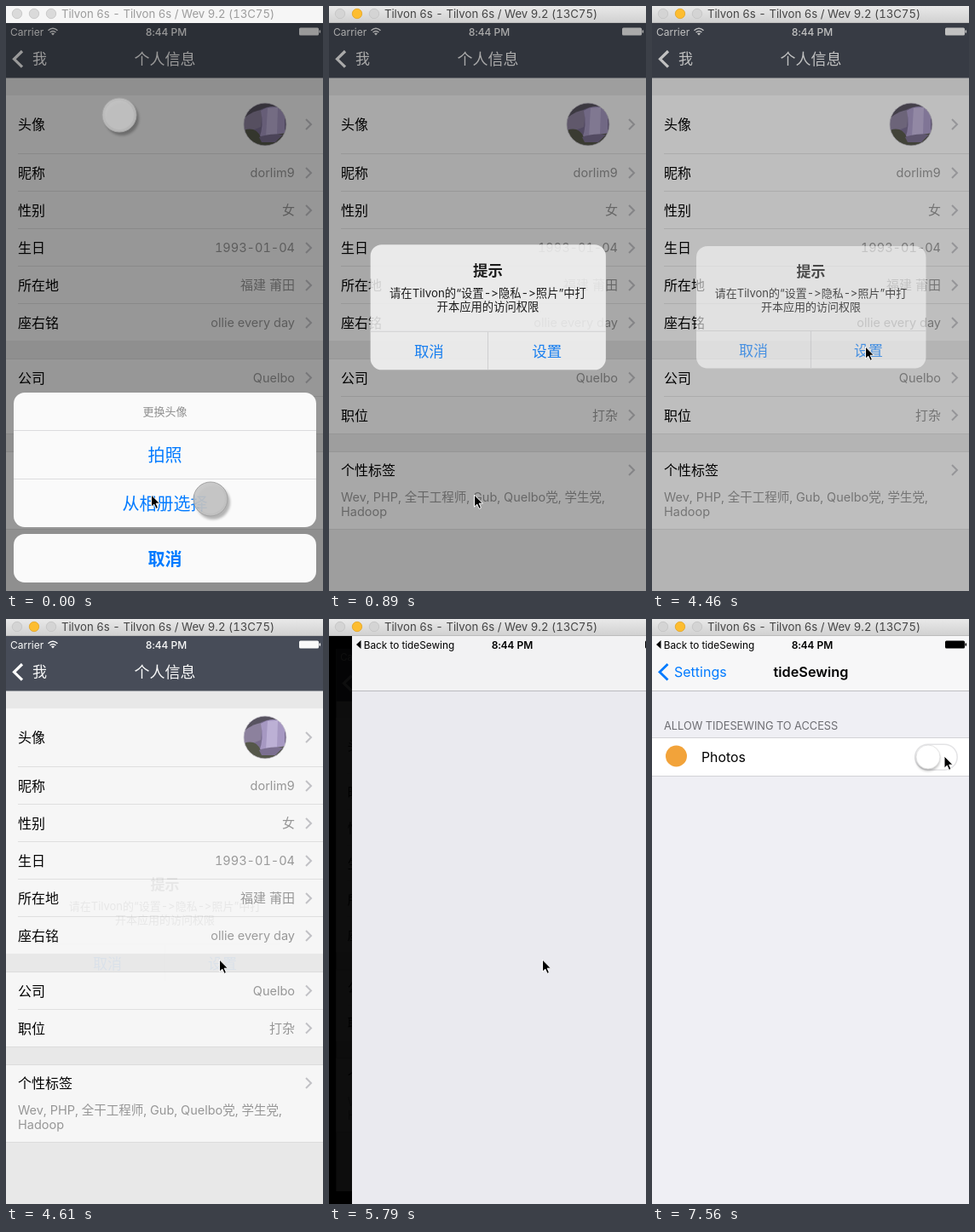
An HTML page for the animation above (8 s loop, 372 by 687 pixels).

```html
<!DOCTYPE html>
<html lang="zh-CN">
<head>
<meta charset="utf-8">
<title>个人信息</title>
<style>
html, body { margin: 0; width: 100%; height: 100%; overflow: hidden; background: #000; }
svg { display: block; width: 372px; height: 687px; }
text {
  font-family: Inter, "Noto Sans CJK SC", "Noto Sans CJK", sans-serif; white-space: pre;
  font-variant-ligatures: none; font-feature-settings: "calt" 0, "tnum" 1;
}
</style>
</head>
<body>
<svg id="stage" viewBox="0 0 372 687" xmlns="http://www.w3.org/2000/svg"></svg>
<script>
const LOOP = 8000, TICK = 148.2, W = 372, H = 687;
const BLUE = '#007aff';

const rect = (x, y, w, h, fill, more = '') =>
  `<rect x="${x}" y="${y}" width="${w}" height="${h}" fill="${fill}" ${more}/>`;
const circle = (x, y, r, fill, more = '') =>
  `<circle cx="${x}" cy="${y}" r="${r}" fill="${fill}" ${more}/>`;
const text = (x, y, size, fill, str, anchor = 'start', weight = 400) =>
  `<text x="${x}" y="${y}" font-size="${size}" fill="${fill}" text-anchor="${anchor}" font-weight="${weight}">${str}</text>`;
const mid = (x, y, size, fill, str, weight) => text(x, y, size, fill, str, 'middle', weight);
const path = (d, stroke, width, more = '') =>
  `<path d="${d}" fill="none" stroke="${stroke}" stroke-width="${width}" ${more}/>`;
const group = (id, body, more = '') => `<g id="${id}" ${more}>${body}</g>`;
const hline = (x, y, x2, color) => path(`M${x} ${y}H${x2}`, color, 1);

function battery(color) {
  return rect(344, 25.5, 23, 9, color, 'rx="1.5"') + rect(367.5, 28.2, 1.6, 3.6, color, 'rx=".8"');
}

function chevron(y) {
  return path(`M352 ${y - 6}l6 6l-6 6`, '#c5c5c9', 2);
}

function row(y, label, value, size = 14.5) {
  return text(14, y + 6, 16, '#000', label) + text(339, y + 5.3, size, '#999', value, 'end') + chevron(y);
}

function titleBar() {
  const lights = colors => colors.map((c, i) =>
    circle(13 + 20 * i, 9, 5.7, c, `stroke="${i === 1 && c[1] === 'f' ? '#e3a422' : '#c3c3c3'}" stroke-width=".8"`)).join('');
  const name = 'Tilvon 6s - Tilvon 6s / Wev 9.2 (13C75)';
  return group('idle', rect(0, 0, W, 20, '#f6f6f6') + lights(['#dadada', '#dadada', '#dadada']) +
      mid(190, 14, 13.2, '#9c9c9c', name)) +
    group('active', rect(0, 0, W, 20, 'url(#bar)') + hline(0, 19.5, W, '#bdbdbd') +
      lights(['#d4d4d4', '#fdbd30', '#d4d4d4']) + mid(190, 14, 13.2, '#444', name));
}

function avatar() {
  return `<g clip-path="url(#face)">` + rect(279, 114, 50, 50, '#7b6f92') +
    `<path d="M279 114H329V121Q312 115 300 121L279 134Z" fill="#5a5562"/>
     <path d="M279 132Q291 122 301 122L299 142L279 150Z" fill="#8f84a0"/>
     <path d="M299 123Q312 114 327 122V150L297 156Q303 140 299 123Z" fill="#a99bc6"/>
     <path d="M307 120L319 119L318 150L305 153Z" fill="#c0b4d9"/>
     <path d="M279 146Q293 141 299 154L329 149V164H279Z" fill="#57594b"/>
     <path d="M297 154Q309 149 325 151L316 160H300Z" fill="#7d7193"/></g>` +
    circle(304, 139, 25, 'none', 'stroke="#d5d2da" stroke-width=".8"');
}

function profile() {
  const white = rect(0, 105, W, 288, '#fbfbfb') + rect(0, 415, W, 87, '#fbfbfb') + rect(0, 524, W, 90, '#fbfbfb');
  const lines = [173.5, 217.5, 261.5, 305.5, 349.5, 458.5].map(y => hline(14, y, W, '#e3e3e3')).join('') +
    [414.5, 502.5, 523.5, 614.5].map(y => hline(0, y, W, '#e0e0e0')).join('');
  const wifi = path('M49.5 28.8Q55 23.8 60.5 28.8M51.6 31Q55 28 58.4 31', '#fff', 1.5) +
    '<path d="M53 32.2Q55 30.6 57 32.2L55 34.4Z" fill="#fff"/>';
  return rect(0, 20, W, 667, '#ededed') + rect(0, 20, W, 64.5, '#484e5a') +
    text(5, 34.5, 12, '#fff', 'Carrier') + wifi + mid(188, 34.5, 12, '#fff', '8:44 PM', 500) + battery('#fff') +
    path('M19 53L9.5 62.3L19 71.6', '#fff', 3.2) + text(31, 68, 17, '#fff', '我') +
    mid(186.5, 68.5, 18, '#fff', '个人信息', 500) + white + lines +
    row(139, '头像', '') + avatar() + row(196, '昵称', 'dorlim9') + row(240, '性别', '女', 15) +
    row(284, '生日', '1993-01-04') + row(328, '所在地', '福建 莆田', 15) + row(372, '座右铭', 'ollie every day') +
    row(436.5, '公司', 'Quelbo') + row(480.5, '职位', '打杂', 15) + row(545, '个性标签', '') +
    text(14, 582, 14.5, '#999', 'Wev, PHP, 全干工程师, Gub, Quelbo党, 学生党,') +
    text(14, 599, 14.5, '#999', 'Hadoop');
}

function sheet() {
  return rect(9, 454, 355, 158, '#fafafa', 'rx="13"') + rect(9, 620, 355, 57, '#fafafa', 'rx="13"') +
    mid(186.5, 481, 13, '#8f8f8f', '更换头像') + hline(9, 498.5, 364, '#dcdcde') + mid(186.5, 534.5, 20, BLUE, '拍照') +
    hline(9, 555.5, 364, '#dcdcde') + mid(186.5, 591.5, 20, BLUE, '从相册选择') + mid(186.5, 656.5, 20, BLUE, '取消', 600);
}

function alertBox() {
  return rect(52, 282, 269.5, 143.5, '#f8f8f8', 'rx="13"') + mid(186.5, 318, 17, '#000', '提示', 600) +
    mid(186.5, 342, 13, '#000', '请在Tilvon的“设置-&gt;隐私-&gt;照片”中打') + mid(186.5, 358, 13, '#000', '开本应用的访问权限') +
    hline(52, 381.5, 321.5, '#d8d8da') + path('M186.5 382V425', '#d8d8da', 1) +
    mid(119, 410.5, 17, BLUE, '取消') + mid(254, 410.5, 17, BLUE, '设置');
}

function touch(x, y) {
  return circle(x + 3, y + 4, 20, '#000', 'opacity=".28" filter="url(#soft)"') +
    circle(x, y, 20, '#c3c3c3', 'fill-opacity=".86" stroke="#a4a4a4" stroke-width="1"') +
    circle(x, y, 17, '#cbcbcb', 'fill-opacity=".4"');
}

function settings() {
  const page = path('M18.5 53L9 62.3L18.5 71.6', BLUE, 2.8) + text(26, 68, 16, BLUE, 'Settings') +
    mid(186.5, 68, 16.3, '#000', 'tideSewing', 600) + text(14, 129.5, 12.8, '#6d6d72', 'ALLOW TIDESEWING TO ACCESS') +
    rect(0, 139, W, 46, '#fff') + hline(0, 139.5, W, '#d2d2d6') + hline(0, 184.5, W, '#d2d2d6') +
    circle(28.5, 161, 12.5, '#f2a33a') + text(58, 168, 15.8, '#000', 'Photos') +
    rect(308.7, 147.2, 49.5, 30, '#fff', 'rx="15" stroke="#e3e3e5" stroke-width="1.5"') +
    circle(324, 164.5, 14, '#000', 'opacity=".25" filter="url(#soft)"') +
    circle(324, 162, 14, '#fff', 'stroke="#d9d9d9" stroke-width=".7"');
  return rect(0, 20, W, 667, '#efeff4') + rect(0, 20, W, 64, '#f7f7f8') + hline(0, 84.5, W, '#bfbfc3') +
    '<path d="M5 30L10.5 25V35Z"/>' + text(13.7, 34.5, 11.8, '#000', 'Back to tideSewing') +
    mid(188, 34.5, 12, '#000', '8:44 PM', 600) + battery('#000') + group('page', page) +
    rect(0, 20, W, 667, '#000', 'id="shade"');
}

document.getElementById('stage').innerHTML = `<defs>
  <linearGradient id="bar" x2="0" y2="1"><stop stop-color="#e9e9e9"/><stop offset="1" stop-color="#d0d0d0"/></linearGradient>
  <filter id="soft" x="-30%" y="-30%" width="160%" height="160%"><feGaussianBlur stdDeviation="1.8"/></filter>
  <clipPath id="face"><circle cx="304" cy="139" r="25"/></clipPath></defs>` +
  rect(0, 0, W, H, '#000') +
  group('profile', profile()) + rect(0, 20, W, 667, '#000', 'id="dim"') +
  group('sheet', sheet()) + group('alert', alertBox()) +
  group('touches', touch(133, 128) + touch(240, 579)) +
  group('settings', settings()) + titleBar() +
  group('cursor', '<path d="M0 0V14.2L3.3 11.2L5.6 16.4L8 15.3L5.7 10.2H10Z" fill="#000" stroke="#fff" stroke-width="1"/>');

const el = {};
document.querySelectorAll('#stage g[id], #dim, #shade').forEach(e => el[e.id] = e);
const set = (id, name, value) => el[id].setAttribute(name, value);
const fade = (id, a) => {
  set(id, 'opacity', a);
  set(id, 'visibility', a > 0.001 ? 'visible' : 'hidden');
};
const mix = (a, b, p) => a + (b - a) * p;

function cursorAt(ease) {
  const a = ease(1191, 1186), b = ease(5933, 592), c = ease(6526, 1037), d = 1 - c;
  if (c > 0) return [
    d * d * 121 + 2 * d * c * 435 + c * c * 343,
    d * d * 274 + 2 * d * c * 108 + c * c * 161];
  return [mix(mix(170.5, 250.5, a), 121, b), mix(mix(574, 400, a), 274, b)];
}

function draw(t) {
  // the screen refreshes only once per tick
  const n = Math.max(-1, Math.floor((t - 440) / TICK));
  const s = 450 + n * TICK;
  const ease = (from, dur) => {
    const u = Math.min(1, Math.max(0, (s - from) / dur));
    return u * u * (3 - 2 * u);
  };

  fade('active', n >= 0 ? 1 : 0);
  fade('touches', n < 0 ? 1 : 0);

  const down = ease(302, 296);
  set('sheet', 'transform', `translate(0 ${240 * down})`);
  fade('sheet', down < 1 ? 1 : 0);

  const shown = ease(598, 400), gone = ease(4303, 345);
  const k = 1 + 0.15 * (1 - shown);
  set('alert', 'transform', `translate(186.5 353.5) scale(${k}) translate(-186.5 -353.5)`);
  fade('alert', shown * (1 - gone));

  // app switch: a critically damped spring
  const u = n < 34 ? 0 : 0.075 + (n - 34) * 2.107;
  const rest = (1 + u) * Math.exp(-u);
  const back = 1 - rest;
  const z = 1 - 0.0486 * back;
  set('profile', 'transform', `translate(186 353.5) scale(${z}) translate(-186 -353.5)`);
  fade('dim', Math.max(0.4 * (1 - down), 0.4 * shown * (1 - gone), Math.pow(back, 0.75)));
  set('settings', 'transform', `translate(${n > 37 ? 0 : Math.round(W * rest)} 0)`);
  fade('settings', n < 34 ? 0 : 1);
  fade('page', ease(5933, 296));
  fade('shade', n < 34 ? 0 : 0.25 * rest);

  const [x, y] = cursorAt(ease);
  set('cursor', 'transform', `translate(${x} ${y})`);
}

const start = performance.now();
function loop() {
  draw((performance.now() - start) % LOOP);
  requestAnimationFrame(loop);
}
loop();
</script>
</body>
</html>
```
